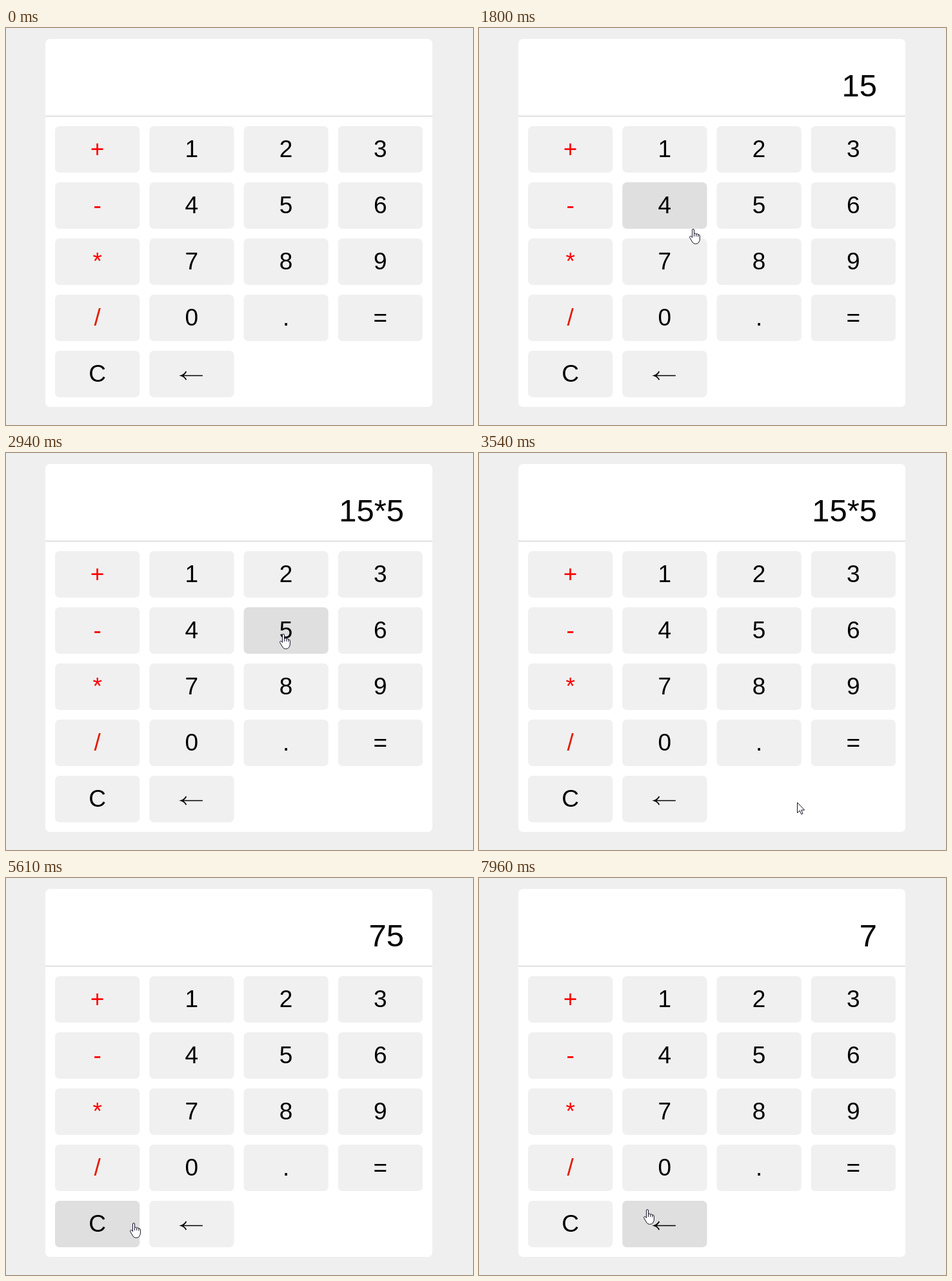
An HTML page for the animation above (8000 ms loop, 724x615 px).

```html
<!DOCTYPE html>
<html lang="en">
<head>
<meta charset="utf-8">
<title>Calculator</title>
<style>
  html, body { margin: 0; width: 100%; height: 100%; overflow: hidden; background: #efefef; }
  svg { display: block; width: 724px; height: 615px; }
  text { font-family: "Liberation Sans", Arial, sans-serif; }
  .label { font-size: 37px; text-anchor: middle; }
  #display { font-size: 49px; text-anchor: end; }
  .cursor { fill: #fff; stroke: #14142a; stroke-linejoin: round; }
</style>
</head>
<body>
<svg viewBox="0 0 724 615">
  <rect width="724" height="615" fill="#efefef"/>
  <rect x="61" y="17" width="600" height="570" rx="7" fill="#fff"/>
  <rect x="61" y="136" width="600" height="1" fill="#c8c8c8"/>
  <text id="display" x="617" y="106"></text>
  <g id="keys"></g>
  <g id="pointer">
    <path id="arrow" class="cursor" d="M.5 .5V16.5L4.2 13L6.7 18.6L9 17.6L6.6 12.1H11.6Z"/>
    <g id="hand" class="cursor" transform="translate(-6)">
      <path d="M4.5 13.5V2Q4.5 .6 6 .6T7.5 2V7.5Q10.3 6.4 10.7 8Q13.4 7.2 13.8 9Q16.4 8.6 16.4 11V16Q16.4 19 14.5 21V21.5Q13 23.4 9.5 23.4Q6.5 23.4 5 21L.9 14Q-.1 12 1.5 11.4Q3 11 4.5 13.5Z"/>
      <path fill="none" d="M7.5 7.5V12M10.7 8V12M13.8 9V12.5"/>
    </g>
    <circle id="click" r="12" fill="#f0e80c" opacity=".6"/>
  </g>
</svg>
<script>
const LOOP = 8000, TICK = 66.9, TICK_OFFSET = 20;
const KEY_W = 131.25, KEY_H = 72, GAP = 15;
const $ = id => document.getElementById(id);
const show = (id, on) => $(id).setAttribute('display', on ? 'inline' : 'none');

function make(parent, tag, attrs) {
  const el = document.createElementNS('http://www.w3.org/2000/svg', tag);
  for (const name in attrs) el.setAttribute(name, attrs[name]);
  return parent.appendChild(el);
}

function makeLabel(label, cx, cy, fill) {
  if (label === '←') {
    return make($('keys'), 'path', {
      d: `M${cx + 17} ${cy + 2.5}h-33m7.5 -6.5q-2.5 5 -8 6.5q5.5 1.5 8 6.5`,
      fill: 'none', stroke: fill, 'stroke-width': 1.7
    });
  }
  const text = make($('keys'), 'text', { x: cx, y: cy + 12, class: 'label', fill });
  text.textContent = label;
  return text;
}

const keys = [...'+123-456*789/0.=C←'].map((label, i) => {
  const x = 76 + (i % 4) * (KEY_W + GAP), y = 152 + Math.floor(i / 4) * (KEY_H + GAP);
  const cx = x + KEY_W / 2, cy = y + KEY_H / 2;
  const rect = make($('keys'), 'rect', { x, y, width: KEY_W, height: KEY_H, rx: 7 });
  const color = label === '/' ? '#e41c00' : '+-*'.includes(label) ? '#f00' : '#000';
  return { label, x, y, cx, cy, rect, color, mark: makeLabel(label, cx, cy, color) };
});

// A stop is reached at tick `at`; a pressed key is left two ticks after the press.
const point = (at, x, y) => ({ at, x, y, leave: at });
function visit(label, at, dx, dy, press) {
  const { cx, cy } = keys.find(key => key.label === label);
  return { at, x: cx + dx, y: cy + dy, label, press, leave: press ? press + 2 : at };
}
const rest = (stop, leave) => ({ ...stop, leave });

const stops = [
  point(2, 588, 583),
  visit('1', 10, 5, 24, 16),
  visit('5', 22, -6, 5, 23),
  visit('*', 30, 46, -5, 31),
  visit('7', 36, 34, -13),
  visit('5', 40, -4, 5, 42),
  rest(visit('6', 47, 53, -5), 49),
  point(53, 493, 541),
  point(55, 371, 540),
  rest(visit('=', 61, -20, 6, 64), 76),
  visit('C', 84, 56, -2),
  visit('C', 85, -6, 4),
  visit('←', 88, 0, -6, 93),
  point(100, 329, 594),
  visit('=', 109, -8, -4),
  visit('←', 116, -37, -31),
  visit('←', 119, -26.5, -23)
];
const presses = stops.filter(stop => stop.press);

function pointerAt(tick) {
  const i = stops.findLastIndex(stop => stop.at <= tick);
  const from = stops[Math.max(i, 0)], to = stops[i + 1] || from;
  const k = tick <= from.leave ? 0 : (tick - from.leave) / (to.at - from.leave);
  return [from.x + (to.x - from.x) * k, from.y + (to.y - from.y) * k];
}

function enter(text, label) {
  if (label === '=') return String(text.split('*').reduce((a, b) => a * b));
  return label === '←' ? text.slice(0, -1) : text + label;
}

function render(ms) {
  const tick = Math.floor((ms + TICK_OFFSET) / TICK);
  const visible = tick >= stops[0].at;
  const pressed = presses.some(stop => stop.press === tick);
  const [px, py] = pointerAt(tick);
  let overKey = false;

  for (const { x, y, rect } of keys) {
    const hover = visible && px >= x && px <= x + KEY_W && py >= y && py <= y + KEY_H;
    overKey = overKey || hover;
    rect.setAttribute('fill', !hover ? '#f0f0f0' : pressed ? '#cfcfcf' : '#dfdfdf');
  }
  for (const { label, mark, color } of keys) {
    const active = presses.some(stop => stop.press === tick && stop.label === label);
    if (label !== '←') mark.setAttribute('fill', active && color === '#000' ? '#500' : color);
  }
  $('display').textContent = presses
    .filter(stop => stop.press < tick)
    .reduce((text, stop) => enter(text, stop.label), '');
  $('pointer').setAttribute('transform', `translate(${Math.round(px)} ${Math.round(py)})`);
  show('pointer', visible);
  show('hand', overKey);
  show('arrow', !overKey);
  show('click', pressed);
}

const start = performance.now();
function loop() {
  render((performance.now() - start) % LOOP);
  requestAnimationFrame(loop);
}
loop();
</script>
</body>
</html>
```
